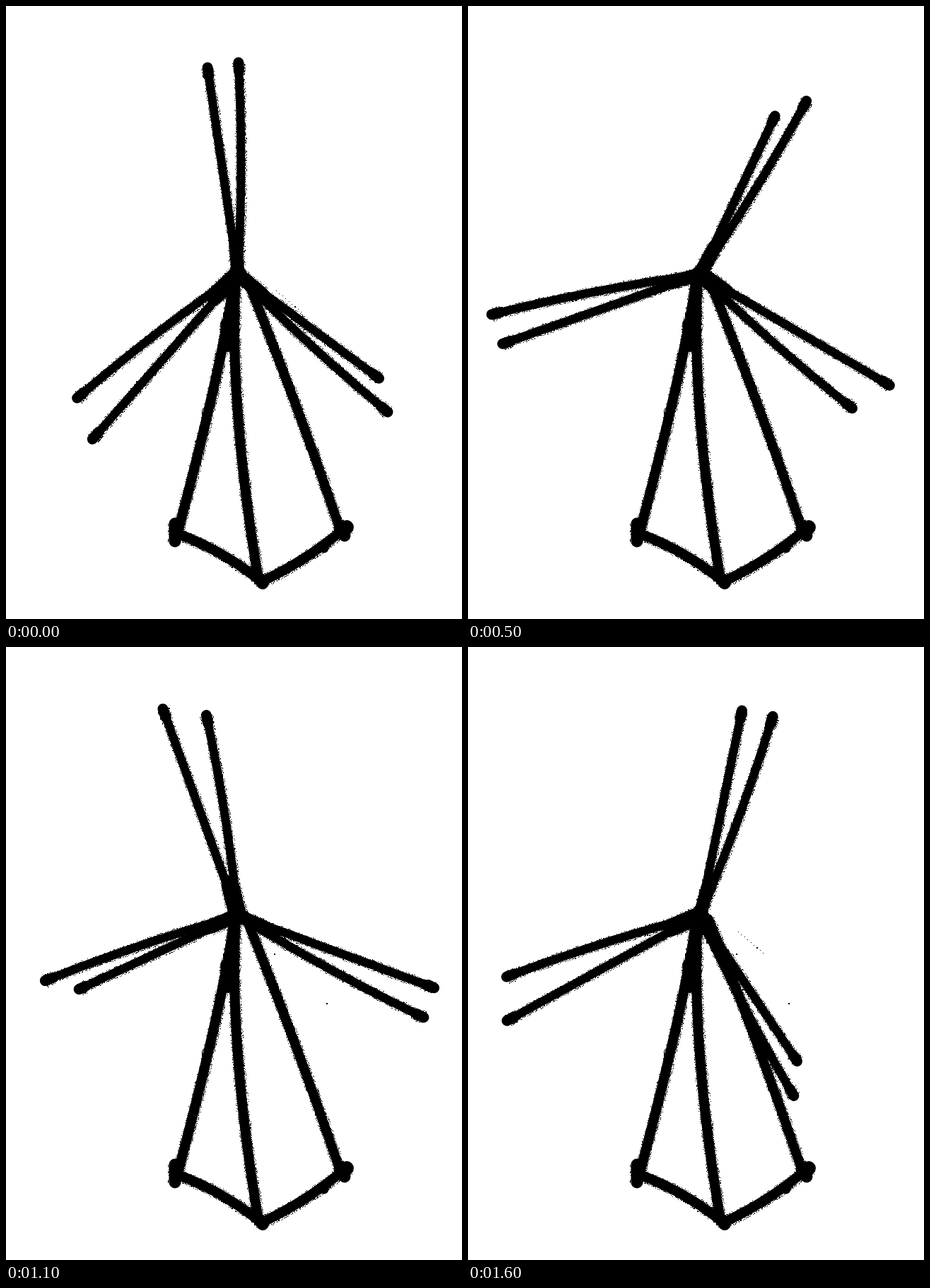
These frames come from a looping animation (645 by 868 pixels, 1.7 s). An HTML page with a canvas:

```html
<!DOCTYPE html>
<html lang="en">
<head>
<meta charset="utf-8">
<title>Windmill</title>
<style>
  html, body { margin: 0; height: 100%; overflow: hidden; background: #fff; }
  canvas { display: block; }
</style>
</head>
<body>
<canvas id="stage" width="645" height="868"></canvas>
<script>
const ctx = document.getElementById('stage').getContext('2d');
const HUB = { x: 328, y: 380 };
const STEP_MS = 100, STEPS = 17, TURNS = 18;

// Each blade is a pair of lines, `spread` degrees to either side of `angle`.
const blades = [
  { angle: -5, spread: 4.25, lengths: [296, 300], root: 19 },
  { angle: 128.6, spread: 3.1, lengths: [248, 288], root: 20 },
  { angle: 226, spread: 5.5, lengths: [311, 287], root: 25 }
];

let seed;
function random() {
  seed = (seed * 1664525 + 1013904223) >>> 0;
  return seed / 4294967296;
}

function speck(x, y, size = 1) {
  ctx.fillRect(Math.round(x), Math.round(y), size, size);
}

// Points along a quadratic curve.
function curve([x0, y0], [cx, cy], [x1, y1]) {
  return Array.from({ length: 25 }, (_, i) => {
    const t = i / 24, s = 1 - t;
    return [s * s * x0 + 2 * s * t * cx + t * t * x1, s * s * y0 + 2 * s * t * cy + t * t * y1];
  });
}

// Ink stroke with a grainy edge.
function brush(points, width) {
  ctx.lineWidth = width;
  ctx.beginPath();
  points.forEach(p => ctx.lineTo(...p));
  ctx.stroke();
  for (let i = 1; i < points.length; i++) {
    const [x, y] = points[i - 1];
    const dx = points[i][0] - x, dy = points[i][1] - y, length = Math.hypot(dx, dy);
    for (let d = 0; d < length; d += 0.5) {
      const side = random() < 0.5 ? -1 : 1;
      const out = side * (width / 2 - 0.5 + 2.5 * random() ** 2);
      speck(x + (dx * d - dy * out) / length, y + (dy * d + dx * out) / length);
    }
  }
}

function drawTower() {
  const left = [240, 746], front = [361, 815], right = [477, 741];
  brush(curve([323, 385], [308, 500], [243, 745]), 14);
  brush(curve([325, 385], [315, 560], [357, 812]), 14);
  brush(curve([340, 385], [411, 560], [472, 740]), 13.5);
  brush(curve(left, [307, 771], front), 14);
  brush(curve(front, [424, 786], right), 14);
  // Knots where the ink has pooled.
  brush([[310, 450], [314, 483]], 14);
  brush([[239, 733], [239, 758]], 17);
  brush([[474, 741], [482, 738]], 20);
  brush([[476, 738], [479, 750]], 17);
  brush([[450, 764], [450, 768]], 13);
  brush([[360, 812], [363, 817]], 18);
}

function drawBlades(turn) {
  const phase = turn / TURNS;
  const rotation = -360 * phase + 0.9 * Math.cos(2 * Math.PI * phase);
  for (const { angle, spread, lengths, root } of blades) {
    const at = (degrees, radius) => {
      const a = (degrees + rotation) * Math.PI / 180;
      return [HUB.x + radius * Math.sin(a), HUB.y - radius * Math.cos(a)];
    };
    const center = at(0, 0);
    lengths.forEach((length, i) => {
      const direction = angle + (i ? spread : -spread);
      const line = curve(center, at(direction + i * 3, length / 2), at(direction, length));
      brush(line, 12);
      brush(line.slice(-2), 15);
    });
    brush([center, at(angle, 44)], root);
  }
}

function drawDust() {
  for (let i = 0; i < 9; i++) speck(382 + i * 4.4, 403 + i * 3.7, i === 6 ? 2 : 1);
  speck(379, 434, 2);
  speck(453, 504, 2);
}

function draw(step) {
  ctx.fillStyle = '#fff';
  ctx.fillRect(0, 0, 645, 868);
  ctx.fillStyle = ctx.strokeStyle = '#000';
  ctx.lineCap = ctx.lineJoin = 'round';
  seed = 7;
  drawTower();
  // One of the 18 turns is skipped, so the wheel jumps twice as far there.
  drawBlades(step > 5 ? step + 1 : step);
  drawDust();
}

let shown = -1;
function tick() {
  const step = Math.floor(performance.now() / STEP_MS) % STEPS;
  if (step !== shown) draw(shown = step);
  requestAnimationFrame(tick);
}
tick();
</script>
</body>
</html>
```
